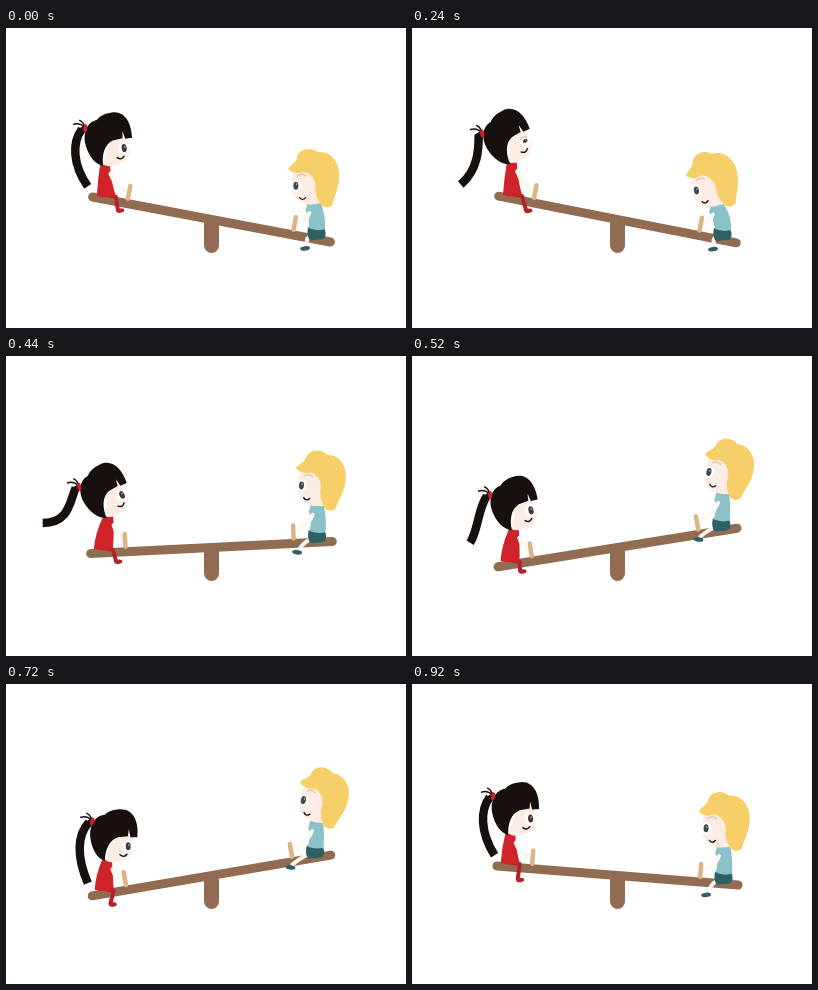
Recreate the animation shown at these times as an HTML page with a canvas. Size 400 by 300 pixels, loop 0.96 s.

```html
<!DOCTYPE html>
<html lang="en">
<head>
<meta charset="utf-8">
<title>Seesaw</title>
<style>
  html, body { margin: 0; width: 100%; height: 100%; overflow: hidden; background: #fff; }
  canvas { display: block; width: 400px; height: 300px; }
</style>
</head>
<body>
<canvas id="stage" width="400" height="300"></canvas>
<script>
const ctx = document.getElementById('stage').getContext('2d');
const STEP = 40, STEPS = 24, CYCLE = 25; // the swing is cut one step short
const PIVOT = { x: 205.5, y: 191.5 };
const C = {
  wood: '#926c52', grip: '#dbb586', skin: '#fcede4', arm: '#fdf6f1', lid: '#ecc9ae',
  dark: '#17100f', red: '#cf2229', leg: '#b3222a', blond: '#f7cf69',
  shirt: '#8bc2c7', shorts: '#2f6063', iris: '#3c3c40', boyIris: '#3a4a4c'
};

// step, tilt | girl: head x y turn, tail bend, tip x y, foot x y, eye | boy: head x y turn, foot x y
const POSES = [
  [0, 10.7, 1.7, -55.5, -8, -11.5, 3, 58, 14, 16, 1, -3.5, -56.7, 0, -12, 14],
  [3, 13.1, -1, -56, -16, -6, -6, 57, 15, 18, .7, -7.3, -56, -5, -8, 11],
  [6, 11.1, -5.4, -57, -25, -2, -21, 51, 16, 17, .45, -10.5, -55.5, -10, -10, 14],
  [11, -2.8, .6, -57, -24, -8, -36, 36, 15, 14, 1, 2.4, -57.7, 7, -20.6, 15],
  [15, -13.1, 6.8, -55.6, -4, -13, -2, 61, 10, 11, 1, 8, -57, 16, -25, 13],
  [20, -5.2, 9.5, -52.3, 0, -14, -7, 60, 8.5, 19, 1, 5, -55.7, 11, -24, 16],
  [23, 4.5, 4.8, -53.5, -4, -11.5, 2, 59, 10, 18, 1, 0, -58, 2, -18, 16]
];

function key(i) {
  const n = POSES.length, turn = Math.floor(i / n);
  const p = POSES[i - turn * n];
  return { k: p[0] + turn * CYCLE, v: p.slice(1) };
}

// Smooth curve through the poses
function poseAt(step) {
  let i = POSES.length - 1;
  while (POSES[i][0] > step) i--;
  const [a, b, c, d] = [i - 1, i, i + 1, i + 2].map(key);
  const h = c.k - b.k, u = (step - b.k) / h, u2 = u * u, u3 = u2 * u;
  return b.v.map((p, j) => {
    const m0 = (c.v[j] - a.v[j]) / (c.k - a.k) * h;
    const m1 = (d.v[j] - p) / (d.k - b.k) * h;
    return (2 * u3 - 3 * u2 + 1) * p + (u3 - 2 * u2 + u) * m0
      + (3 * u2 - 2 * u3) * c.v[j] + (u3 - u2) * m1;
  });
}

const rad = deg => deg * Math.PI / 180;

function place(o, deg, x, y) {
  const c = Math.cos(rad(deg)), s = Math.sin(rad(deg));
  return { x: o.x + x * c - y * s, y: o.y + x * s + y * c };
}

function shape(d, color) {
  ctx.fillStyle = color;
  ctx.fill(new Path2D(d));
}

function line(d, color, width, cap = 'round') {
  ctx.strokeStyle = color;
  ctx.lineWidth = width;
  ctx.lineCap = cap;
  ctx.lineJoin = 'round';
  ctx.stroke(new Path2D(d));
}

function oval(x, y, rx, ry, color, turn = 0) {
  ctx.fillStyle = color;
  ctx.beginPath();
  ctx.ellipse(x, y, rx, ry, rad(turn), 0, 2 * Math.PI);
  ctx.fill();
}

function within(o, deg, draw) {
  ctx.save();
  ctx.translate(o.x, o.y);
  ctx.rotate(rad(deg));
  draw();
  ctx.restore();
}

function eye(x, y, open, color) {
  oval(x, y, 5.5, 6, '#fff');
  oval(x + .3, y, 2.5, 4 * open, color);
  oval(x + 1, y - 1.3 * open, .7, 1 * open, '#a9adb2');
}

function tail(tie, bend, tipX, tipY) {
  within(tie, 0, () => {
    line(`M-3,1 C${bend - 1},14 ${bend - 1},36 ${tipX},${tipY}`, C.dark, 8.5, 'butt');
    line('M0,0 L-4,2', C.dark, 5);
    line('M0,-1 Q-5,-6 -11,-4 M0,-1 Q-1,-6 -5,-8', C.dark, 1.5);
  });
}

function girl(p, tilt) {
  const [hx, hy, turn, bend, tipX, tipY, fx, fy, open] = p;
  const hip = place(PIVOT, tilt, -107.5, -5);
  const head = { x: hip.x + hx, y: hip.y + hy };
  const neck = place(head, turn, -7, 25);
  const grip = place(PIVOT, tilt, -86, -11);
  const foot = { x: hip.x + fx, y: hip.y + fy };
  tail(place(head, turn, -22, -14), bend, tipX, tipY);

  line(`M${hip.x + 3},${hip.y + 1} L${hip.x + 9},${hip.y + 2} L${foot.x - 3},${foot.y - 1}`, C.leg, 4);
  oval(foot.x - .5, foot.y, 4, 2.2, C.leg, -8);
  shape(`M${neck.x - 5},${neck.y} Q${hip.x - 9},${hip.y - 14} ${hip.x - 10},${hip.y + 1}
    Q${hip.x},${hip.y + 4} ${hip.x + 9},${hip.y + 1}
    Q${neck.x + 6},${neck.y + 18} ${neck.x + 5},${neck.y}Z`, C.red);
  line(`M${neck.x + 6},${neck.y + 9} Q${neck.x + 9},${neck.y + 19} ${grip.x},${grip.y}`, C.arm, 5);

  within(head, turn, () => {
    shape('M-9,24 L2,0 L18,0 Q18,8 20,13 C18,22 11,27 2,27 Q-5,28 -9,24Z', C.skin);
    eye(14, 11, open, C.iris);
    if (open < .9) line('M11,8 Q14,6 17,8', C.lid, 1.8);
    line('M6,19.5 Q10,23 13,19', C.dark, 1.4);
    shape(`M23.5,2 C25,-13 20,-26 7,-26 C0,-26 -6,-24 -9,-20.5
      C-19,-20 -25,-9 -23.5,3 C-22,14 -17,23 -9,26
      C-9,15 -5,5 4,2 L14,1 L15,-6 L16.5,2Z`, C.dark);
    oval(-21.5, -14, 2, 4, C.red, 15);
  });
}

function boy(p, tilt) {
  const [hx, hy, turn, fx, fy] = p;
  const hip = place(PIVOT, tilt, 106.5, -5);
  const head = { x: hip.x + hx, y: hip.y + hy };
  const neck = place(head, turn, 0, 26);
  const grip = place(PIVOT, tilt, 82.5, -11);
  const foot = { x: hip.x + fx, y: hip.y + fy };

  line(`M${hip.x - 5},${hip.y + 1} Q${hip.x - 12},${hip.y + 3} ${foot.x + 2},${foot.y - 3}`, C.arm, 4);
  oval(foot.x, foot.y, 5, 2.2, C.shorts, tilt < 0 ? 8 : -8);
  shape(`M${hip.x - 9},${hip.y - 7} L${hip.x + 7},${hip.y - 7}
    Q${hip.x + 11},${hip.y + 3} ${hip.x + 5},${hip.y + 5}
    L${hip.x - 7},${hip.y + 6} Q${hip.x - 11},${hip.y + 2} ${hip.x - 9},${hip.y - 7}Z`, C.shorts);
  shape(`M${neck.x - 6},${neck.y - 1} L${neck.x + 7},${neck.y - 1}
    Q${hip.x + 9},${hip.y - 18} ${hip.x + 8},${hip.y - 5}
    Q${hip.x},${hip.y - 3} ${hip.x - 8},${hip.y - 6}
    L${neck.x - 5},${neck.y + 11} L${neck.x - 8},${neck.y + 7}Z`, C.shirt);
  line(`M${neck.x - 4},${neck.y + 9} Q${neck.x - 6},${neck.y + 18} ${grip.x},${grip.y}`, C.arm, 3.5);

  within(head, turn, () => {
    shape('M-20,-7 L2,-7 L8,25 Q-8,30 -17,21 Q-24,13 -22,4Z', C.skin);
    eye(-18, 8, 1, C.boyIris);
    line('M-16,-2 Q-12,-5 -8,-2', C.lid, 1.8);
    line('M-14,20 Q-11,23.5 -8,20', C.dark, 1.4);
    shape(`M-25.5,-8.5 C-23,-13 -18,-15 -17,-19 C-16,-28 -4,-32 4,-25.5
      C18,-27 27,-14 25.5,1 C25,12 20,19 19,27 C15,31 9,30 7,26
      C4,22 1,16 2,9 C2,2 -3,-5 -10,-6 C-15,-4 -21,-4 -25.5,-8.5Z`, C.blond);
  });
}

function draw(step) {
  const pose = poseAt(step), tilt = pose[0];
  ctx.fillStyle = '#fff';
  ctx.fillRect(0, 0, 400, 300);
  line('M205.5,196 V217.5', C.wood, 15);
  within(PIVOT, tilt, () => line('M-121,0 H121', C.wood, 9));
  girl(pose.slice(1, 10), tilt);
  boy(pose.slice(10), tilt);
  within(PIVOT, tilt, () => line('M-86,-5 V-18 M82.5,-5 V-18', C.grip, 4.5));
}

const start = performance.now();
let shown = -1;
function tick() {
  const step = Math.floor((performance.now() - start) / STEP) % STEPS;
  if (step !== shown) draw(shown = step);
  requestAnimationFrame(tick);
}
tick();
</script>
</body>
</html>
```
